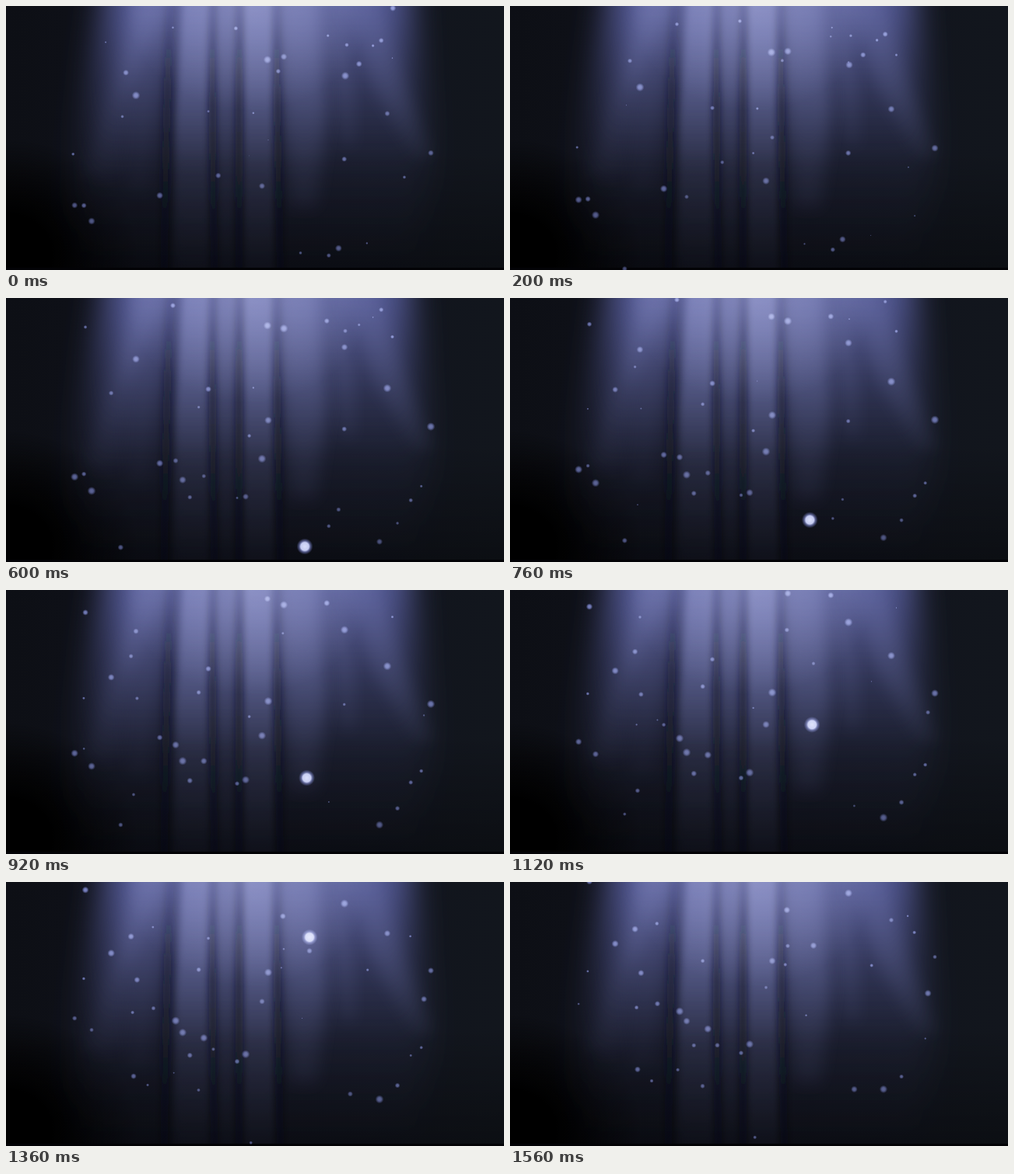
These frames come from a looping animation (640 px wide and 340 px high, 1.6 s). An HTML page:

```html
<!DOCTYPE html>
<html lang="en">
<head>
<meta charset="utf-8">
<title>Light through deep water</title>
<style>
  html, body { margin: 0; width: 100%; height: 100%; overflow: hidden; background: #10121b; }
  svg { display: block; width: 100vw; height: 100vh; }
  #dots { mix-blend-mode: screen; }
</style>
</head>
<body>
<svg viewBox="0 0 640 340" preserveAspectRatio="none">
  <defs>
    <linearGradient id="water">
      <stop offset="0" stop-color="#0d0f15"/>
      <stop offset=".5" stop-color="#11131d"/>
      <stop offset="1" stop-color="#12161d"/>
    </linearGradient>
    <linearGradient id="depth" x2="0" y2="1">
      <stop offset=".55" stop-color="#000" stop-opacity="0"/>
      <stop offset="1" stop-color="#000" stop-opacity=".35"/>
    </linearGradient>
    <linearGradient id="cone" gradientUnits="userSpaceOnUse" x1="0" y1="0" x2="0" y2="340">
      <stop offset="0" stop-color="#5c62a4" stop-opacity=".86"/>
      <stop offset=".3" stop-color="#5c62a4" stop-opacity=".44"/>
      <stop offset=".6" stop-color="#5c62a4" stop-opacity=".12"/>
      <stop offset="1" stop-color="#5c62a4" stop-opacity="0"/>
    </linearGradient>
    <linearGradient id="beam" gradientUnits="userSpaceOnUse" x1="0" y1="0" x2="0" y2="340">
      <stop offset="0" stop-color="#9298d2" stop-opacity=".58"/>
      <stop offset=".3" stop-color="#8e95d4" stop-opacity=".42"/>
      <stop offset=".6" stop-color="#8e95d4" stop-opacity=".17"/>
      <stop offset="1" stop-color="#8e95d4" stop-opacity=".05"/>
    </linearGradient>
    <linearGradient id="fold" gradientUnits="userSpaceOnUse" x1="0" y1="0" x2="0" y2="340">
      <stop offset="0" stop-color="#12142a" stop-opacity=".1"/>
      <stop offset=".35" stop-color="#12142a" stop-opacity=".5"/>
      <stop offset="1" stop-color="#0c0d16" stop-opacity=".4"/>
    </linearGradient>
    <radialGradient id="glow">
      <stop offset="0" stop-color="#c0c3ea" stop-opacity=".3"/>
      <stop offset="1" stop-color="#c0c3ea" stop-opacity="0"/>
    </radialGradient>
    <radialGradient id="murk">
      <stop offset=".35" stop-color="#000"/>
      <stop offset="1" stop-color="#000" stop-opacity="0"/>
    </radialGradient>
    <radialGradient id="dot">
      <stop offset="0" stop-color="#747dc0"/>
      <stop offset=".45" stop-color="#6b74b8" stop-opacity=".9"/>
      <stop offset="1" stop-color="#6068b0" stop-opacity="0"/>
    </radialGradient>
    <radialGradient id="spark">
      <stop offset="0" stop-color="#d6dbf8"/>
      <stop offset=".5" stop-color="#c2c8f0"/>
      <stop offset=".7" stop-color="#7880c8" stop-opacity=".6"/>
      <stop offset="1" stop-color="#6068b0" stop-opacity="0"/>
    </radialGradient>
    <filter id="wide" x="-20%" y="-20%" width="140%" height="140%"><feGaussianBlur stdDeviation="20"/></filter>
    <filter id="soft" x="-30%" y="-20%" width="160%" height="140%"><feGaussianBlur stdDeviation="5"/></filter>
    <filter id="hazy" x="-30%" y="-20%" width="160%" height="140%"><feGaussianBlur stdDeviation="10"/></filter>
  </defs>

  <rect width="640" height="340" fill="url(#water)"/>
  <ellipse cx="0" cy="320" rx="170" ry="150" fill="url(#murk)"/>
  <path d="M130-50L126 0L108 110L85 250L110 400H510L545 220L528 90L520 0V-50Z" fill="url(#cone)" filter="url(#wide)"/>
  <g fill="url(#beam)">
    <path d="M165-30L160 0L135 100L100 220H150L152 120L205 0V-30Z" opacity=".32" filter="url(#hazy)"/>
    <path d="M165-30L150 120L155 240H185L195 110L208-30Z" opacity=".32" filter="url(#hazy)"/>
    <path d="M228-30L218 150L215 400H266L262 150L263-30Z" opacity=".9" filter="url(#soft)"/>
    <path d="M270-30L268 150L270 400H296L297 150L297-30Z" opacity=".65" filter="url(#soft)"/>
    <path d="M305-30L303 150L303 400H346L345 150L343-30Z" filter="url(#soft)"/>
    <path d="M350-30L354 120L365 260H400L412 140L404-30Z" opacity=".75" filter="url(#hazy)"/>
    <path d="M408-30L420 90L432 180H448L446 90L432-30Z" opacity=".35" filter="url(#hazy)"/>
    <path d="M420-30L470 100L525 195H550L512 100L470-30Z" opacity=".36" filter="url(#hazy)"/>
  </g>
  <g fill="none" stroke="url(#fold)" stroke-width="9" filter="url(#soft)">
    <path d="M212-20Q206 100 203 360M265-20Q264 100 268 360M300-20Q299 150 300 360M347-20Q348 150 353 360"/>
  </g>
  <ellipse cx="312" cy="-5" rx="160" ry="140" fill="url(#glow)"/>
  <rect width="640" height="340" fill="url(#depth)"/>
  <rect y="337" width="640" height="3" fill="#030306"/>
  <g id="dots"></g>
</svg>
<script>
const LOOP = 1600, STEP = 40, MOTES = 66;
const layer = document.getElementById('dots');

// the brightest dots: x, y and time of birth in seconds
const bright = [
  [167, 141, -.86], [336, 90, -.75], [357, 75, -.45], [436, 141, -1.3], [435, 73, .15],
  [490, 144, -.3], [337, 173, -.02], [329, 240, -.4], [227, 249, 0], [110, 290, -.55],
  [308, 264, .2], [546, 196, -.35], [218, 215, .3], [480, 322, .2]
];

let seed = 29;
function rand(lo, hi) {
  seed = (seed * 16807) % 2147483647;
  return lo + (hi - lo) * seed / 2147483647;
}

function circle(fill) {
  const el = document.createElementNS('http://www.w3.org/2000/svg', 'circle');
  el.setAttribute('fill', `url(#${fill})`);
  layer.appendChild(el);
  return el;
}

function place(el, x, y, r) {
  el.setAttribute('cx', x.toFixed(2));
  el.setAttribute('cy', y.toFixed(2));
  el.setAttribute('r', r.toFixed(2));
}

function makeDot(x, y, born, size = 5.5, life = 2.1) {
  return { x, y, born, size, life, el: circle('dot') };
}

// smaller motes live shorter
function makeMote() {
  const big = rand(0, 1);
  return makeDot(rand(85, 550), rand(20, 360), rand(-1.8, 1.4), 2 + 3.2 * big, 1.1 + big);
}

const dots = bright.map(d => makeDot(...d));
for (let i = 0; i < MOTES; i++) dots.push(makeMote());
const spark = circle('spark');

// each dot swells, fades and rises ever faster
function drawDot(d, t) {
  const age = t - d.born;
  if (age <= 0 || age >= d.life) {
    d.el.setAttribute('r', 0);
    return;
  }
  const swell = Math.sqrt(Math.sin(Math.PI * age / d.life));
  const y = d.y - 12 * age - 21 * age * age;
  place(d.el, d.x, y, d.size * swell);
  d.el.setAttribute('opacity', ((.55 + .45 * swell) * (1 - .35 * y / 340)).toFixed(3));
}

function render(ms) {
  const t = Math.floor((ms % LOOP) / STEP) * STEP / 1000;
  dots.forEach(d => drawDot(d, t));
  const s = t - .6;
  place(spark, 384 + 8 * s, 320 - 183 * s - 190 * s * s, 10.5);
}

const start = performance.now();
function tick() {
  render(performance.now() - start);
  requestAnimationFrame(tick);
}
render(0);
requestAnimationFrame(tick);
</script>
</body>
</html>
```
